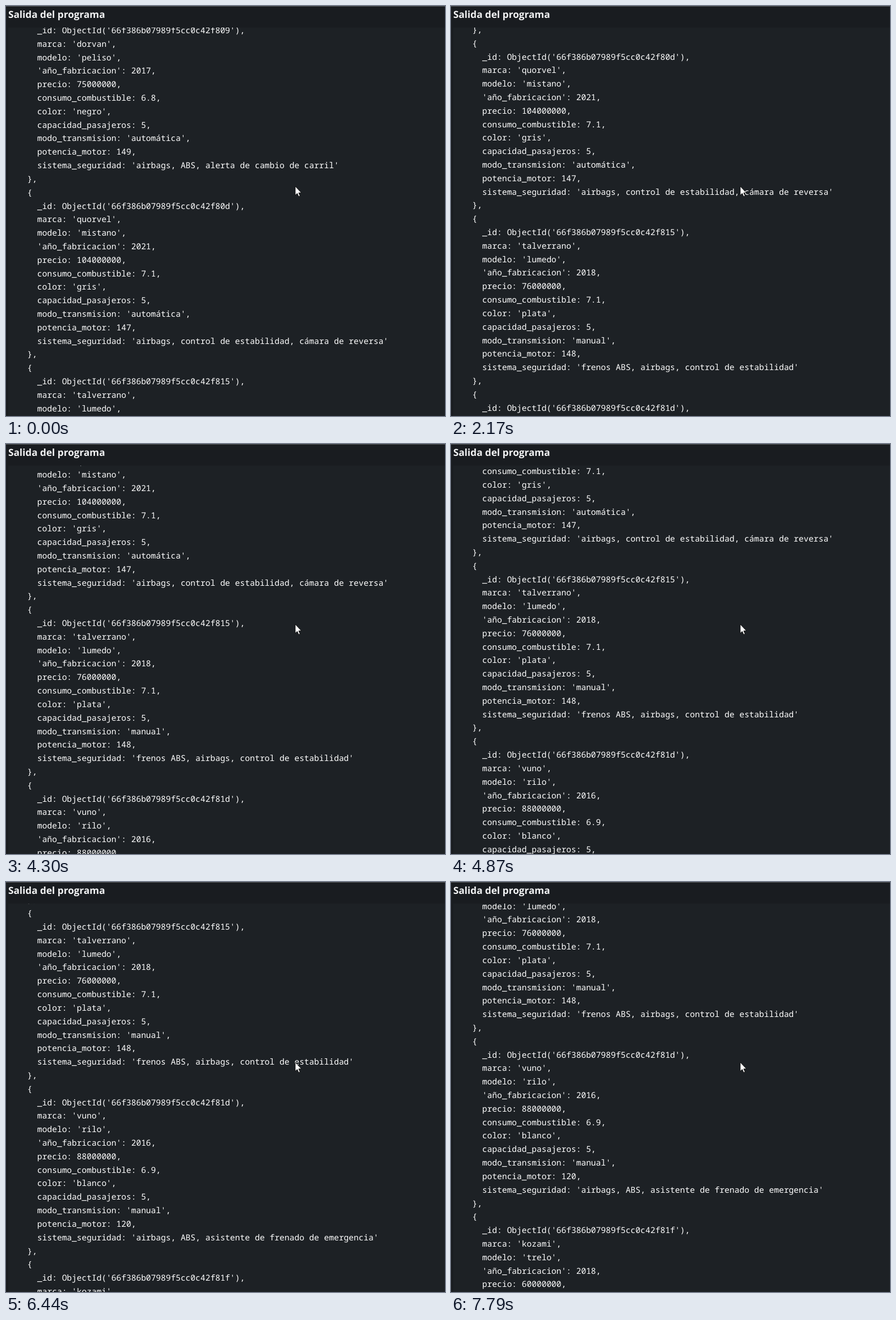
An HTML page that plays this animation: 774 by 723 pixels, repeating every 8 s.

```html
<!DOCTYPE html>
<html lang="es">
<head>
<meta charset="utf-8">
<title>Salida del programa</title>
<style>
  html, body { margin: 0; width: 100%; height: 100%; overflow: hidden; background: #191c20; }
  body { position: relative; text-rendering: geometricPrecision; }
  body::before { content: ""; position: absolute; inset: 0 0 auto; height: 1px; background: #55585b; }
  h1 { position: absolute; left: 4px; top: 4px; margin: 0; color: #f1f2f3;
       font: bold 17.2px/24px "Open Sans", sans-serif; white-space: pre; }
  #output { position: absolute; inset: 38px 0 0 4px; overflow: hidden; background: #1d2125;
            color: #fff; font: 14.54px/24px "Noto Sans Mono", monospace; }
  #output div { position: absolute; left: 16.2px; white-space: pre; }
  svg { position: absolute; left: 509px; top: 317px; }
</style>
</head>
<body>
<h1>Salida del programa</h1>
<div id="output"></div>
<svg width="14" height="22" viewBox="-1 -1 14 22">
  <path d="M0 0V15.6L3.5 12.4L6 18L8.4 17L6 11.5H10.8Z" fill="#fff" stroke="#000" stroke-width=".8"/>
</svg>
<script>
const LOOP = 8000, LINE_HEIGHT = 23.81, FIRST_TOP = -7;

const cars = [
  ['09', 'dorvan', 'peliso', 2017, 75000000, 6.8, 'negro', 'automática', 149, 'airbags, ABS, alerta de cambio de carril'],
  ['0d', 'quorvel', 'mistano', 2021, 104000000, 7.1, 'gris', 'automática', 147, 'airbags, control de estabilidad, cámara de reversa'],
  ['15', 'talverrano', 'lumedo', 2018, 76000000, 7.1, 'plata', 'manual', 148, 'frenos ABS, airbags, control de estabilidad'],
  ['1d', 'vuno', 'rilo', 2016, 88000000, 6.9, 'blanco', 'manual', 120, 'airbags, ABS, asistente de frenado de emergencia'],
  ['1f', 'kozami', 'trelo', 2018, 60000000, 5.8, 'rojo', 'manual', 90, 'airbags, ABS'],
];

const record = ([id, brand, model, year, price, usage, color, gearbox, power, safety]) => [
  `    _id: ObjectId('66f386b07989f5cc0c42f8${id}'),`,
  `    marca: '${brand}',`,
  `    modelo: '${model}',`,
  `    'año_fabricacion': ${year},`,
  `    precio: ${price},`,
  `    consumo_combustible: ${usage},`,
  `    color: '${color}',`,
  `    capacidad_pasajeros: 5,`,
  `    modo_transmision: '${gearbox}',`,
  `    potencia_motor: ${power},`,
  `    sistema_seguridad: '${safety}'`,
  '  },',
  '  {',
];

const output = document.getElementById('output');
const lines = cars.flatMap(record).map(text => {
  const line = document.createElement('div');
  line.textContent = text;
  output.append(line);
  return line;
});

// Runs of evenly spaced scroll steps: first time, last time, count
const runs = [
  [730, 1710, 8], [1870, 2850, 8], [2990, 3710, 6],
  [4300, 5270, 8], [5430, 6440, 8], [6580, 7510, 8], [7650, 7790, 2],
];
const stepTimes = runs.flatMap(([first, last, count]) =>
  Array.from({ length: count }, (_, i) => first + (last - first) * i / (count - 1)));

// Two decelerating scrolls: step, distance, speed in pixels per step
const path = [
  [0, 0, 25], [3, 77.5, 26], [11, 263, 14], [22, 331, 1],
  [23, 346, 20], [31, 492, 15.5], [38, 583, 10.5], [48, 667, 6.5],
];

function scrollAt(step) {
  const i = Math.max(1, path.findIndex(([n]) => n >= step));
  const [n0, y0, v0] = path[i - 1], [n1, y1, v1] = path[i];
  const span = n1 - n0, u = (step - n0) / span, w = 1 - u;
  return w * w * (1 + 2 * u) * y0 + u * u * (3 - 2 * u) * y1
    + span * u * w * (w * v0 - u * v1);
}

function draw(now) {
  const time = now % LOOP;
  const scroll = scrollAt(stepTimes.filter(t => t <= time).length);
  lines.forEach((line, i) => {
    line.style.top = Math.round(FIRST_TOP + i * LINE_HEIGHT - scroll) + 'px';
  });
  requestAnimationFrame(draw);
}
draw(performance.now());
</script>
</body>
</html>
```
